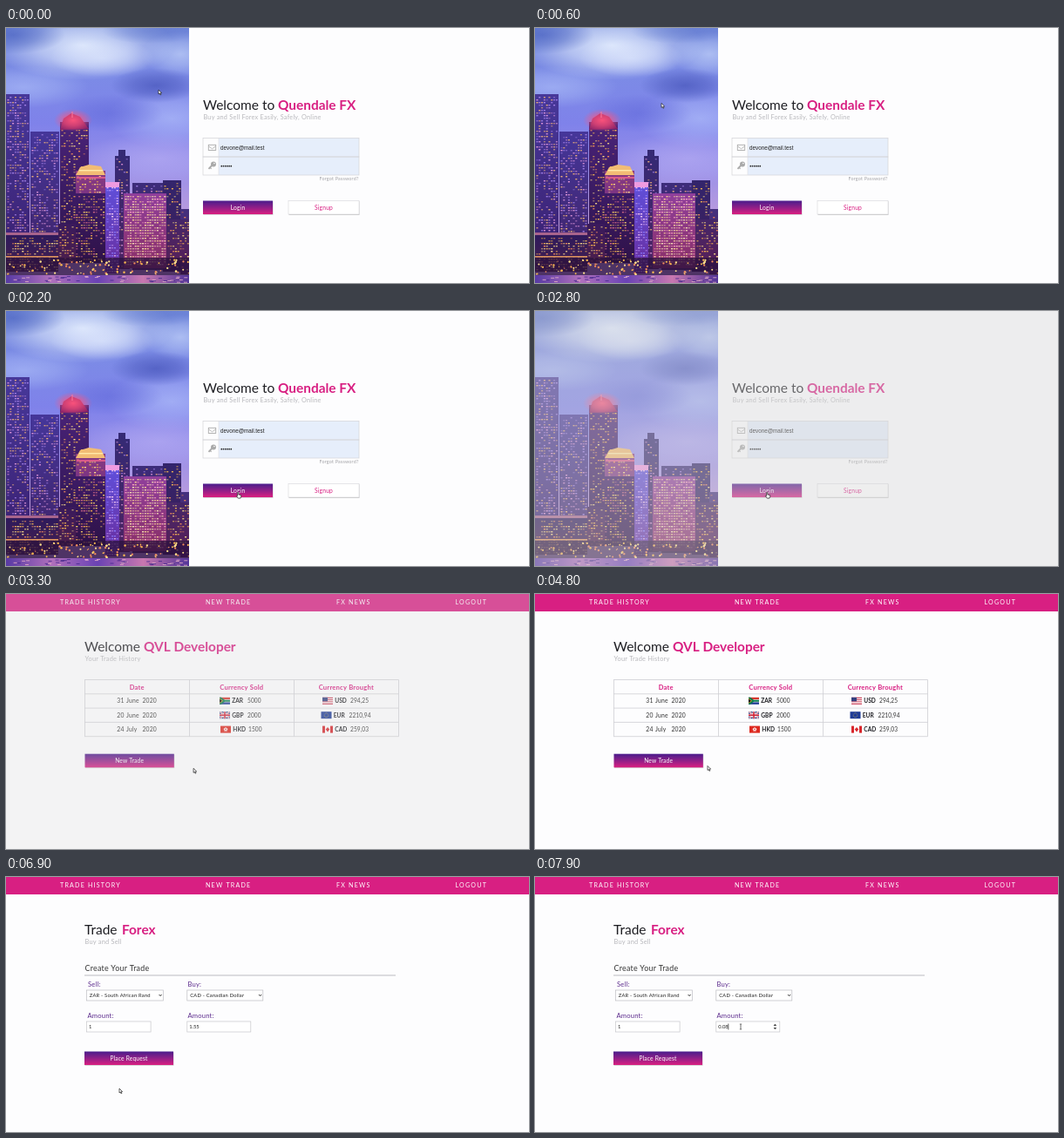
Animation of 600x293 px, one loop 8000 ms. Source, as an HTML page with a canvas:

```html
<!DOCTYPE html>
<html lang="en">
<head>
<meta charset="utf-8">
<title>Forex demo</title>
<style>
html, body { margin: 0; width: 100%; height: 100%; overflow: hidden; background: #fdfdfe; }
canvas { display: block; width: 600px; height: 293px; }
</style>
</head>
<body>
<canvas id="stage"></canvas>
<script>
const W = 600, H = 293, LOOP = 8000;
const PINK = '#d81f82', PURPLE = '#5b2a8c', INK = '#1d1d22', PALE = '#b8b8bc', PAPER = '#fdfdfe';
const dpr = window.devicePixelRatio || 1;
const stage = document.getElementById('stage');
let g = prepare(stage, W, H);

function prepare(canvas, w, h) {
  canvas.width = Math.round(w * dpr);
  canvas.height = Math.round(h * dpr);
  const ctx = canvas.getContext('2d');
  ctx.scale(dpr, dpr);
  return ctx;
}

function rect(x, y, w, h, color) {
  g.fillStyle = color;
  g.fillRect(x, y, w, h);
}

function frame(x, y, w, h, color, width = 0.7) {
  g.strokeStyle = color;
  g.lineWidth = width;
  g.strokeRect(x, y, w, h);
}

function line(points, color, width) {
  g.strokeStyle = color;
  g.lineWidth = width;
  g.beginPath();
  points.forEach(([x, y]) => g.lineTo(x, y));
  g.stroke();
}

function shape(points, fill) {
  g.beginPath();
  points.forEach(([x, y]) => g.lineTo(x, y));
  g.closePath();
  g.fillStyle = fill;
  g.fill();
}

function dot(x, y, r, fill) {
  g.beginPath();
  g.arc(x, y, r, 0, 7);
  g.fillStyle = fill;
  g.fill();
}

// y is the middle of the capital letters
function text(s, x, y, size, color, { weight = 400, align = 'left', gap = 0.2, face = 'Lato' } = {}) {
  g.font = `${weight} ${size}px "${face}", sans-serif`;
  g.letterSpacing = gap + 'px';
  g.textAlign = align;
  g.fillStyle = color;
  g.fillText(s, x, y + size * 0.36);
}

function title(light, bold, x, boldX, y) {
  text(light, x, y, 15.5, INK, { gap: 0 });
  text(bold, boldX, y, 15.4, PINK, { weight: 700, gap: 0 });
}

function fade(x0, y0, x1, y1, stops) {
  const grad = g.createLinearGradient(x0, y0, x1, y1);
  stops.forEach((c, i) => grad.addColorStop(i / (stops.length - 1), c));
  return grad;
}

function button(label, x, y, w, h) {
  rect(x + 0.5, y + 0.8, w, h, 'rgba(0,0,0,.18)');
  rect(x, y, w, h, fade(0, y, 0, y + h, ['#4a1d8c', '#8f1f88', '#da1f80']));
  text(label, x + w / 2, y + h / 2, 6.6, '#fff', { align: 'center' });
}

// ---- city panel ----
function random(seed) {
  return () => (seed = (seed * 16807) % 2147483647) / 2147483647;
}

function cloud(x, y, rx, ry, rgb, alpha) {
  g.save();
  g.translate(x, y);
  g.scale(rx, ry);
  const grad = g.createRadialGradient(0, 0, 0, 0, 0, 1);
  grad.addColorStop(0, `rgba(${rgb},${alpha})`);
  grad.addColorStop(0.5, `rgba(${rgb},${alpha * 0.6})`);
  grad.addColorStop(1, `rgba(${rgb},0)`);
  rect(-1, -1, 2, 2, grad);
  g.restore();
}

function tower(rnd, x, y, w, h, top, low, lights, density) {
  rect(x, y, w, h, fade(0, y, 0, y + h, [top, low]));
  for (let wy = y + 3; wy < y + h - 2; wy += 3)
    for (let wx = x + 1.5; wx < x + w - 2; wx += 2.8)
      if (rnd() < density) {
        g.globalAlpha = 0.4 + 0.6 * rnd();
        rect(wx, wy, 2, 1.4, lights[Math.floor(rnd() * lights.length)]);
      }
  g.globalAlpha = 1;
}

function paintCity() {
  const rnd = random(71);
  const gold = ['#f7b850', '#ffe08a', '#f08a5c'], mauve = ['#a884ec', '#e398dc', '#f0b27a'];
  rect(0, 0, 210, H, fade(0, 0, 0, 220, ['#6d84d8', '#7c8be6', '#7f82ea', '#9a90e8', '#bd9cdc']));
  cloud(20, 68, 75, 24, '168,184,246', 0.7);
  cloud(88, 20, 105, 40, '224,234,253', 0.95);
  cloud(110, 34, 60, 22, '228,236,254', 0.6);
  cloud(200, 30, 45, 26, '196,212,250', 0.7);
  cloud(190, 104, 75, 34, '172,186,248', 0.75);
  cloud(172, 66, 52, 20, '76,90,190', 0.8);
  cloud(8, 8, 60, 22, '80,104,196', 0.8);
  cloud(120, 98, 60, 22, '98,106,218', 0.6);
  cloud(175, 150, 90, 30, '186,176,244', 0.6);
  cloud(165, 4, 55, 14, '104,128,208', 0.6);

  tower(rnd, 125, 147, 17, 130, '#352a74', '#4d2262', mauve, 0.35);
  rect(129, 140, 8, 8, '#352a74');
  tower(rnd, 145, 178, 40, 100, '#3c2c7a', '#4a2260', mauve, 0.35);
  tower(rnd, 180, 175, 21, 105, '#33256c', '#3d1c58', gold, 0.25);
  tower(rnd, 200, 208, 10, 75, '#43307e', '#561f62', gold, 0.4);
  tower(rnd, 0, 76, 27, 175, '#47389a', '#3c2274', mauve, 0.5);
  tower(rnd, 28, 119, 33, 140, '#45369a', '#40246c', mauve, 0.45);
  tower(rnd, 62, 108, 33, 160, '#4a2378', '#2c144e', gold, 0.35);
  shape([[62, 117], [66, 104], [75, 98], [85, 102], [95, 116]], '#8c2468');
  cloud(77, 106, 22, 13, '255,84,124', 0.95);
  line([[76, 96], [76, 103]], '#ff7a9a', 1);
  tower(rnd, 80, 164, 34, 30, '#8a3a80', '#7a3484', gold, 0.5);
  shape([[80, 169], [85, 160], [95, 157], [109, 159], [114, 169]], '#f2bc74');
  rect(84, 163, 27, 1.4, '#ffe9a8');
  rect(81, 171, 33, 2, '#d85a8c');
  tower(rnd, 76, 190, 38, 80, '#3d1b66', '#2e1248', ['#ffd868', '#f7b04c', '#d46a86'], 0.5);
  tower(rnd, 114, 177, 16, 105, '#5f50dc', '#6a2c9c', ['#d5a8ff', '#ffd0f4', '#8a7cff'], 0.6);
  rect(114, 177, 16, 6, '#f09ae0');
  tower(rnd, 135, 190, 49, 86, '#8f3f9c', '#8a2f66', ['#ffd694', '#ffa6c4', '#fbe6b6'], 0.75);
  tower(rnd, 184, 220, 26, 50, '#442668', '#56205a', gold, 0.45);
  tower(rnd, 60, 225, 20, 45, '#3a1a5c', '#4c1e4c', gold, 0.45);
  tower(rnd, 0, 238, 60, 42, '#2e1a5c', '#48204e', gold, 0.5);
  rect(0, 235, 60, 3, '#a8648c');
  rect(0, 262, 60, 1.5, '#e0965e');
  rect(0, 264, 210, 21, 'rgba(42,16,62,.75)');
  for (let i = 0; i < 110; i++) dot(rnd() * 210, 266 + rnd() * 17, 0.6 + rnd() * 0.7, gold[i % 3]);
  rect(0, 284, 210, 9, fade(0, 0, 210, 0, ['#583aa4', '#b070bc', '#6a42b4', '#c878b0', '#523498']));
  for (let i = 0; i < 50; i++) rect(rnd() * 206, 285 + rnd() * 7, 4, 0.8, i % 2 ? '#eab2c8' : '#44278c');
}

const city = document.createElement('canvas');
g = prepare(city, 210, H);
paintCity();
g = prepare(stage, W, H);

// ---- login page ----
function envelope() {
  frame(232.3, 134.3, 8.4, 6.2, '#aaa', 0.9);
  line([[232.3, 135.8], [236.5, 138.8], [240.7, 135.8]], '#aaa', 0.8);
}

function key() {
  dot(238, 156.4, 3, '#aaa');
  dot(238.9, 155.5, 0.8, PAPER);
  line([[237, 157.2], [232.5, 161.8]], '#aaa', 1.9);
  line([[234, 160.2], [235.6, 161.8]], '#aaa', 1.2);
}

function loginPage() {
  g.drawImage(city, 0, 0, 210, H);
  title('Welcome to', 'Quendale FX', 226, 312, 88.5);
  text('Buy and Sell Forex Easily, Safely, Online', 226.5, 102.3, 7.3, PALE, { gap: 0.22 });
  rect(244, 126.5, 161, 42.5, '#e6eefb');
  frame(226, 126.5, 179, 21.5, '#d3d3d8');
  frame(226, 148, 179, 21, '#d3d3d8');
  line([[244, 126.5], [244, 169]], '#dcdce0', 0.6);
  envelope();
  key();
  text('devone@mail.test', 246, 137.3, 6.3, '#222', { face: 'Liberation Sans', gap: 0 });
  for (let i = 0; i < 6; i++) dot(247.3 + i * 2.2, 158.7, 0.85, '#222');
  text('Forgot Password?', 404.5, 173.5, 5.4, '#a2a2a6', { align: 'right' });
  button('Login', 226, 198.5, 80, 15.5);
  rect(324.5, 199.2, 81, 15.8, 'rgba(0,0,0,.2)');
  rect(324, 198.5, 81, 15.5, '#fff');
  frame(324, 198.5, 81, 15.5, '#d6d6da', 0.6);
  text('Signup', 364.5, 206.3, 6.7, PINK, { align: 'center' });
}

// ---- inner pages ----
function header(light, bold, boldX, sub) {
  rect(0, 0, W, 20, PINK);
  [['TRADE HISTORY', 62], ['NEW TRADE', 229], ['FX NEWS', 379], ['LOGOUT', 515.5]]
    .forEach(([s, x]) => text(s, x, 9.8, 7.1, '#fff', { gap: 1.2 }));
  title(light, bold, 90, boldX, 60.3);
  text(sub, 90.5, 74, 7.4, PALE);
}

const flags = {
  ZAR(x, y) {
    rect(x, y, 12, 4, '#d8382f');
    rect(x, y + 4, 12, 4, '#1c3a92');
    rect(x, y + 2.4, 12, 3.2, '#fff');
    shape([[x, y], [x + 2, y], [x + 6, y + 3], [x + 12, y + 3], [x + 12, y + 5], [x + 6, y + 5], [x + 2, y + 8], [x, y + 8]], '#0a7a4b');
    shape([[x, y + 1], [x + 4, y + 4], [x, y + 7]], '#e9b632');
    shape([[x, y + 1.8], [x + 3, y + 4], [x, y + 6.2]], '#111');
  },
  GBP(x, y) {
    rect(x, y, 12, 8, '#1f3377');
    for (const [color, width] of [['#fff', 1.8], ['#cf2338', 0.6]]) {
      line([[x + 0.6, y + 0.4], [x + 11.4, y + 7.6]], color, width);
      line([[x + 0.6, y + 7.6], [x + 11.4, y + 0.4]], color, width);
    }
    for (const [color, width] of [['#fff', 2.8], ['#cf2338', 1.6]]) {
      line([[x + 6, y], [x + 6, y + 8]], color, width);
      line([[x, y + 4], [x + 12, y + 4]], color, width);
    }
  },
  HKD(x, y) {
    rect(x, y, 12, 8, '#de2a20');
    for (let i = 0; i < 5; i++)
      dot(x + 6 + 1.5 * Math.sin(i * 1.257), y + 4 - 1.5 * Math.cos(i * 1.257), 0.85, '#fff');
  },
  USD(x, y) {
    for (let i = 0; i < 7; i++) rect(x, y + i * 8 / 7, 12, 8 / 7, i % 2 ? '#fff' : '#c7304a');
    rect(x, y, 6, 4.5, '#35407f');
  },
  EUR(x, y) {
    rect(x, y, 12, 8, '#1d3a97');
    for (let i = 0; i < 12; i++)
      dot(x + 6 + 2.4 * Math.cos(i * Math.PI / 6), y + 4 + 2.4 * Math.sin(i * Math.PI / 6), 0.35, '#ecc93c');
  },
  CAD(x, y) {
    rect(x, y, 12, 8, '#fff');
    rect(x, y, 3, 8, '#d8262c');
    rect(x + 9, y, 3, 8, '#d8262c');
    shape([[x + 6, y + 1.2], [x + 7, y + 3], [x + 8.4, y + 3.3], [x + 7, y + 5.6], [x + 6, y + 6.8], [x + 5, y + 5.6], [x + 3.6, y + 3.3], [x + 5, y + 3]], '#d8262c');
  }
};

function money(code, amount, x, y) {
  flags[code](x, y - 4);
  text(code, x + 14.3, y, 6.6, INK, { weight: 700, gap: 0 });
  text(amount, x + 32, y, 6.6, '#333', { gap: 0.1 });
}

const trades = [
  ['31', 'June', 'ZAR', '5000', 245, 'USD', '294,25', 363],
  ['20', 'June', 'GBP', '2000', 245, 'EUR', '2210,94', 361.5],
  ['24', 'July', 'HKD', '1500', 246, 'CAD', '259,03', 363]
];

function historyPage() {
  header('Welcome', 'QVL Developer', 158, 'Your Trade History');
  for (let i = 0; i < 5; i++) line([[90, 98.5 + i * 16.3], [450.5, 98.5 + i * 16.3]], '#cfcfd4', 0.8);
  for (let i = 0; i < 4; i++) line([[90.5 + i * 120, 98.5], [90.5 + i * 120, 163.7]], '#cfcfd4', 0.8);
  ['Date', 'Currency Sold', 'Currency Brought'].forEach((s, i) =>
    text(s, 150.3 + i * 120, 106.8, 7.6, PINK, { weight: 700, align: 'center' }));
  trades.forEach(([day, month, sold, paid, soldX, got, worth, gotX], i) => {
    const y = 122.8 + i * 16.4;
    text(day, 127.3, y, 6.8, '#333');
    text(month, 138, y, 6.8, '#333');
    text('2020', 173, y, 6.8, '#333', { align: 'right' });
    money(sold, paid, soldX, y);
    money(got, worth, gotX, y);
  });
  button('New Trade', 90.5, 183.7, 102.3, 15.6);
}

function select(value, x, w) {
  rect(x, 130, w, 12, '#fff');
  frame(x + 0.3, 130, w, 12, '#bbbbc0');
  text(value, x + 3.7, 136, 5.8, '#222');
  line([[x + w - 4.4, 135], [x + w - 2.9, 136.7], [x + w - 1.4, 135]], '#222', 0.9);
}

function input(value, x, w) {
  rect(x, 166, w, 12, '#fff');
  frame(x + 0.3, 166, w, 12, '#c6c6cb');
  text(value, x + 2.7, 172, 5.8, '#222', { gap: 0 });
}

function tradePage(t) {
  const focused = t >= 7450;
  header('Trade', 'Forex', 133, 'Buy and Sell');
  text('Create Your Trade', 90.5, 104.3, 8.9, '#333', { gap: 0.25 });
  line([[90, 113], [447, 113]], '#b4b4b8', 0.9);
  text('Sell:', 94, 123, 7.6, PURPLE);
  text('Buy:', 208.5, 123, 7.6, PURPLE);
  select(t < 6800 ? 'EUR - Euro' : 'ZAR - South African Rand', 92, 88);
  select('CAD - Canadian Dollar', 207.5, 87);
  text('Amount:', 93.5, 159.3, 7.6, PURPLE);
  text('Amount:', 208.5, 159.3, 7.6, PURPLE);
  input('1', 92.3, 73.5);
  input(focused ? '0.08' : '1.55', 207.5, 73);
  if (t >= 7300) {
    shape([[273.6, 171], [275.4, 168.8], [277.2, 171]], '#444');
    shape([[273.6, 173], [275.4, 175.2], [277.2, 173]], '#444');
  }
  if (focused) line([[221.8, 168.5], [221.8, 175.5]], '#222', 0.7);
  button('Place Request', 90, 200.5, 102, 15.5);
}

// ---- pointer ----
const path = [
  [0, 175, 71], [300, 175, 71], [1200, 60, 130], [1400, 60, 130], [2000, 265, 208.5], [3100, 265, 208.5],
  [3400, 198, 197.5], [4800, 198, 197.5], [5050, 166, 192], [5500, 160, 191],
  [5800, 150, 136], [6100, 150, 137], [6500, 142, 260], [6750, 130, 243], [6950, 130, 243],
  [7350, 236, 172], [8000, 236, 172]
];

function pointerAt(t) {
  const i = path.findIndex(p => p[0] > t);
  const [t0, x0, y0] = path[i - 1], [t1, x1, y1] = path[i];
  const k = (t - t0) / (t1 - t0), e = k * k * (3 - 2 * k);
  return [x0 + (x1 - x0) * e, y0 + (y1 - y0) * e];
}

function outlined(points) {
  g.lineJoin = 'round';
  shape(points, '#fff');
  g.strokeStyle = '#222';
  g.lineWidth = 0.7;
  g.stroke();
}

function pointer(t) {
  const [x, y] = pointerAt(t);
  const hand = (t >= 1900 && t < 3100) || (t >= 4950 && t < 5200);
  const beam = t >= 7250;
  g.save();
  g.translate(x, y);
  if (beam) {
    line([[-1.2, -3], [1.2, -3]], '#333', 0.6);
    line([[0, -3], [0, 3]], '#333', 0.7);
    line([[-1.2, 3], [1.2, 3]], '#333', 0.6);
  } else if (hand) {
    outlined([[0.7, 0], [1.7, 0], [1.9, 2.4], [4.6, 3], [4.8, 4.6], [4, 6.6], [1.2, 6.6], [-0.7, 4], [0, 3.4], [0.7, 4]]);
  } else {
    outlined([[0, 0], [0, 5], [1.2, 4], [2, 5.9], [2.9, 5.5], [2.1, 3.7], [3.6, 3.6]]);
  }
  g.restore();
}

function draw(now) {
  const t = now % LOOP;
  rect(0, 0, W, H, PAPER);
  if (t < 3100) loginPage();
  else if (t < 5200) historyPage();
  else tradePage(t);
  // loading veil around the first page change
  const veil = t < 3100 ? Math.min(0.8, (t - 2700) / 250) : (3400 - t) / 375;
  if (t > 2700 && veil > 0) rect(0, 0, W, H, `rgba(212,212,214,${veil})`);
  pointer(t);
}

const start = performance.now();
function tick() {
  draw(performance.now() - start);
  requestAnimationFrame(tick);
}
tick();
</script>
</body>
</html>
```
